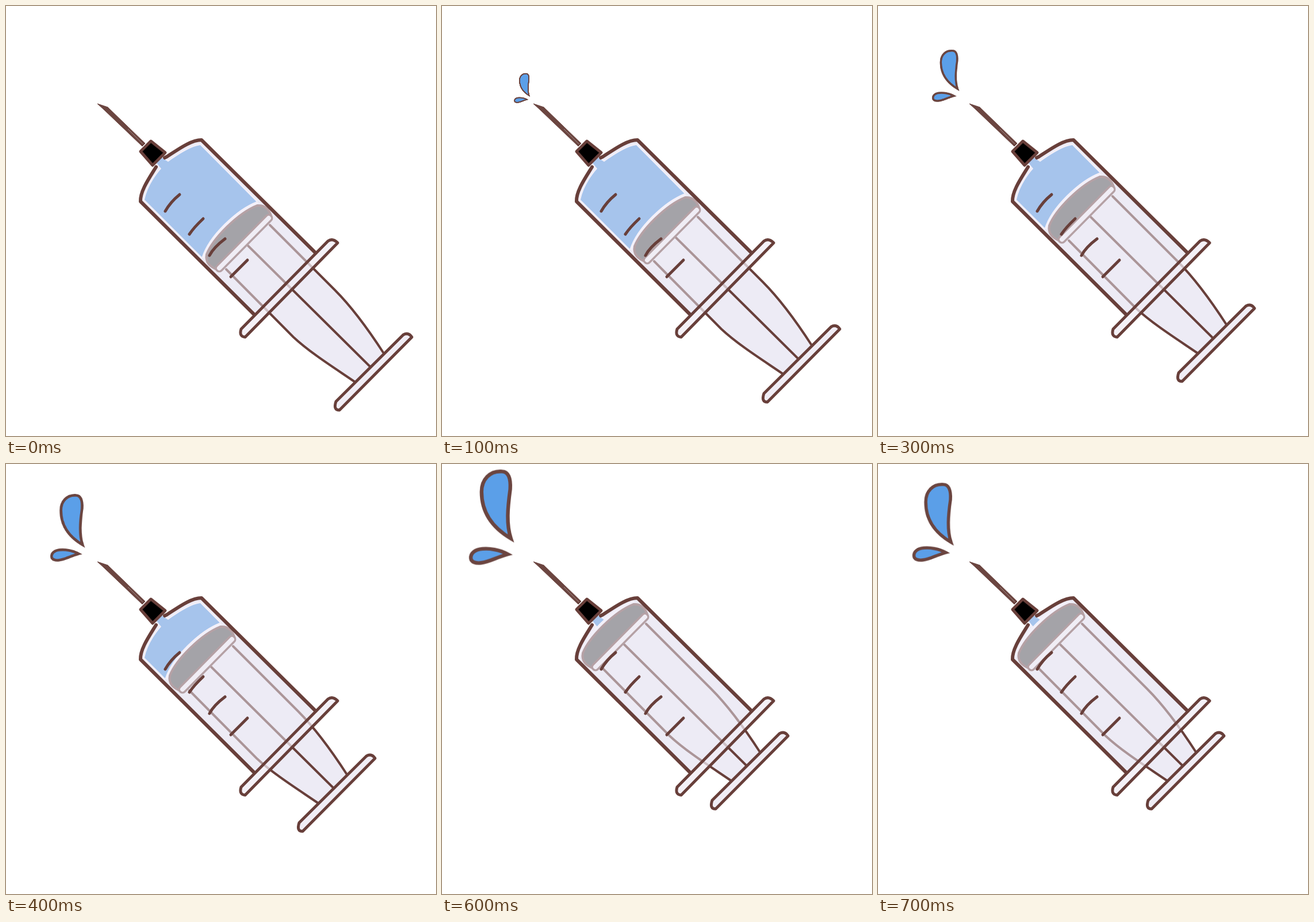
An HTML page without scripts for the animation above (1600 ms loop, 748 px wide and 748 px high).

```html
<!DOCTYPE html>
<html lang="en">
<head>
<meta charset="utf-8">
<title>Syringe</title>
<style>
  html, body { margin: 0; width: 100%; height: 100%; overflow: hidden; background: #fff; }
  svg { display: block; width: 100vw; height: 100vh; }
  .ink { fill: none; stroke: #683f3a; stroke-width: 5; stroke-linecap: round; stroke-linejoin: round; }
  .thin { stroke-width: 4; }
  .wall { stroke-width: 6; }
  .pale { fill: #edebf5; }
  .bar { fill: #f0edf5; }
  .drop { fill: #5b9fe8; stroke: #6b4540; stroke-width: 5.5; }
  .push, .drop { animation: push 1.6s step-end infinite; }
  .big { animation-name: big; }
  .small { animation-name: small; }

  @keyframes push {
    0%     { transform: none; }
    6.25%  { transform: translate(-14px, -14px); }
    12.5%  { transform: translate(-31px, -30px); }
    18.75% { transform: translate(-51px, -50px); }
    25%    { transform: translate(-64px, -64px); }
    31.25% { transform: translate(-87px, -86px); }
    37.5%, 100% { transform: translate(-104px, -103px); }
  }
  @keyframes big {
    0%     { transform: translate(152px, 157px) scale(0); }
    6.25%  { transform: translate(152px, 157px) scale(.38); }
    12.5%  { transform: translate(146px, 152px) scale(.53); }
    18.75% { transform: translate(139px, 146px) scale(.66); }
    25%    { transform: translate(134px, 143px) scale(.855); }
    31.25% { transform: translate(128px, 139px); }
    37.5%  { transform: translate(121px, 133px) scale(1.16); }
    43.75%, 100% { transform: translate(128px, 139px); }
  }
  @keyframes small {
    0%     { transform: translate(149px, 164px) scale(0); }
    6.25%  { transform: translate(149px, 163px) scale(.39); }
    12.5%  { transform: translate(142px, 161px) scale(.54); }
    18.75% { transform: translate(134px, 157px) scale(.656); }
    25%    { transform: translate(129px, 157px) scale(.85); }
    31.25% { transform: translate(121px, 155px); }
    37.5%  { transform: translate(118px, 158px) scale(1.16); }
    43.75%, 100% { transform: translate(121px, 155px); }
  }
</style>
</head>
<body>
<svg viewBox="0 0 748 748">
  <defs>
    <path id="barrel" d="M432 537 L234 340 C233 322 250 298 262 279 L262 272 L272 262 L280 262 C300 249 322 233 340 233 L539 430Z"/>
    <clipPath id="inside"><use href="#barrel"/></clipPath>
  </defs>

  <!-- barrel back and liquid -->
  <use href="#barrel" class="pale"/>
  <path d="M262 273 L270 263 L282 271 C300 258 322 244 338 242 L470 375 L375 471 L241 337 C245 318 255 300 270 283Z"
        fill="#5f9de3" stroke="#f8f5fc" stroke-width="5" paint-order="stroke"/>

  <!-- space behind the stopper -->
  <g clip-path="url(#inside)">
    <g class="push">
      <path class="pale" d="M343 436 C354 400 400 354 436 340 L446 332 L730 616 L610 720 L334 444Z"/>
      <path d="M343 438 C354 402 402 355 438 342" fill="none" stroke="#f8f5fc" stroke-width="5"/>
    </g>
  </g>

  <!-- plunger -->
  <g class="push">
    <path class="pale" d="M383 458 L500 576 C530 604 575 632 607 654 L657 604 C635 570 605 527 572 494 L459 381Z"/>
    <path class="ink thin" d="M383 458 L500 576 C530 604 575 632 607 654 M459 381 L572 494 C605 527 635 570 657 604"/>
    <path class="ink thin" d="M421 417 L633 627"/>
    <path d="M349 432 C360 404 404 360 437 347 C450 346 458 354 462 367 L371 460 C356 455 346 447 349 432Z"
          fill="#5a5a5b" stroke="#7c5654" stroke-width="4"/>
    <path class="ink" style="stroke:#7c5654;stroke-width:15" d="M371 456 L457 369"/>
    <path class="ink" style="stroke:#f3eff5;stroke-width:8" d="M371 456 L457 369"/>
    <path class="ink bar" style="fill:#f0edf5" d="M574 688 L691 572 Q700 567 706 576 L580 703 Q569 703 574 688Z"/>
  </g>

  <!-- barrel glass, outline and scale -->
  <use href="#barrel" fill="#edebf5" opacity=".5"/>
  <path class="ink wall" d="M432 537 L234 340 C233 322 250 298 261 280 M276 264 L280 262 C300 249 322 233 340 233 L539 430"/>
  <path class="ink" d="M277 357 Q286 341 302 328 M319 397 Q327 385 343 370 M354 434 Q361 420 381 405 M391 471 L420 442"/>

  <!-- finger grip -->
  <path class="ink bar" style="fill:#f0edf5" fill-opacity=".75" d="M409 562 L560 409 Q568 403 577 412 L416 576 Q405 575 409 562Z"/>

  <!-- needle and hub -->
  <path fill="#6b4540" stroke="#6b4540" d="M159 170 L177 176 L242 239 L237 244 L171 181Z"/>
  <path d="M212 214 L238 240" stroke="#a58b87" stroke-width="1"/>
  <path class="ink" style="fill:#000" d="M252 235 L277 255 L255 277 L234 253Z"/>

  <path class="drop big" d="M-1 -3 C-8 -24 -6 -48 -2 -77 C-1 -94 -5 -103 -14 -103.500 C-33 -105 -45 -91 -45 -73 C-45 -44 -30 -20 -1 -3Z"/>
  <path class="drop small" d="M-3 -1 C-16 -8 -31 -10 -41 -9 C-53 -8 -59 -2 -58.500 5 C-58 11 -51 13 -43 12 C-29 10 -21 4 -3 -1Z"/>
</svg>
</body>
</html>
```
